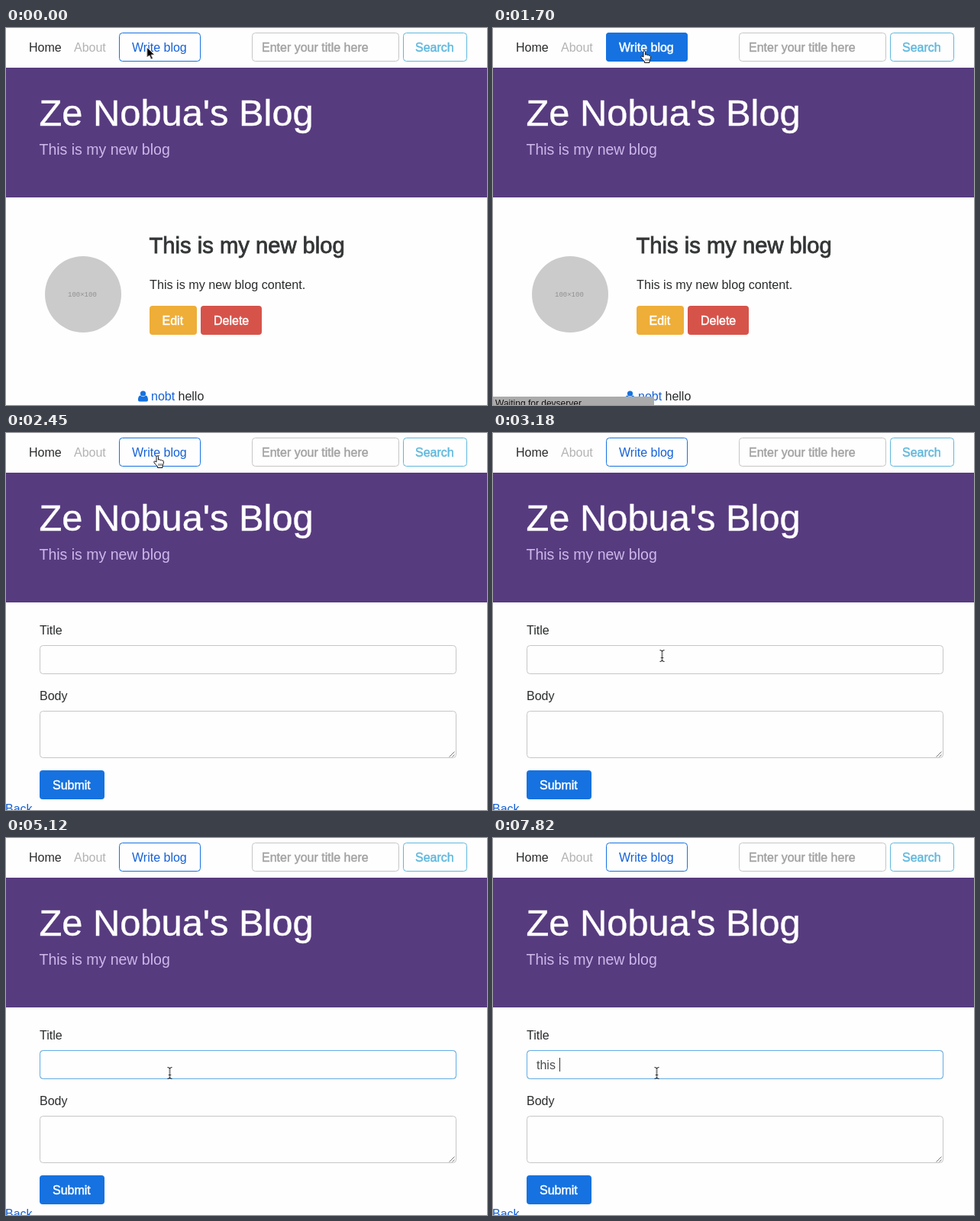
Recreate the animation shown at these times as an HTML page. Size 630 by 494 pixels, loop 8000 ms.

```html
<!DOCTYPE html>
<html lang="en">
<head>
<meta charset="utf-8">
<title>Blog: new post</title>
<style>
html, body { margin: 0; width: 100%; height: 100%; overflow: hidden; background: #fefefe; }
svg { display: block; font: 16px "Liberation Sans", Arial, sans-serif; }
text { --c: #292b2c; fill: var(--c); white-space: pre; }
.white { --c: #fff; }
.link { --c: #1562d8; }
.medium { stroke: var(--c); stroke-width: .45px; }
.box { fill: #fefefe; stroke: #c6c6c6; }
.blue { fill: #1672e0; }
.line { stroke: #1672e0; }

/* every change is a hard cut */
.t { animation: 8s step-end infinite; }
.post { animation-name: post; }
.form { animation-name: form; }
.hover { animation-name: hover; }
.bar { animation-name: bar; }
.url { animation-name: url; }
.wait { animation-name: wait; }
.arrow { animation-name: arrow; }
.hand { animation-name: hand; }
.beam { animation-name: beam; }
.focus { animation-name: focus; }
.caret { animation-name: caret; }
.word { animation-name: word; }

@keyframes post { 0% { visibility: visible } 25%, 100% { visibility: hidden } }
@keyframes form { 0% { visibility: hidden } 25%, 100% { visibility: visible } }
@keyframes hover {
  0%, 25%, 36.125%, 100% { visibility: hidden }
  8.125%, 34.25% { visibility: visible }
}
@keyframes bar {
  0%, 30.625%, 100% { opacity: 0 }
  8.125%, 28.75% { opacity: .5 }
  10% { opacity: 1 }
}
@keyframes url { 0% { visibility: visible } 21.25%, 100% { visibility: hidden } }
@keyframes wait { 0% { visibility: hidden } 21.25%, 100% { visibility: visible } }
@keyframes arrow {
  0% { visibility: visible; transform: translate(184.5px, 25px) }
  6.25% { visibility: hidden; transform: translate(184.5px, 25px) }
  36.125% { visibility: visible; transform: translate(230.5px, 234px) }
  38% { visibility: visible; transform: translate(227px, 255px) }
  39.75%, 100% { visibility: hidden; transform: translate(227px, 255px) }
}
@keyframes hand {
  0% { visibility: hidden; transform: translate(183px, 26px) }
  6.25% { visibility: visible; transform: translate(183px, 26px) }
  8.125% { visibility: visible; transform: translate(193px, 29px) }
  34.25% { visibility: visible; transform: translate(193px, 38px) }
  36.125%, 100% { visibility: hidden; transform: translate(193px, 38px) }
}
@keyframes beam {
  0% { visibility: hidden; transform: translate(221.5px, 292px) }
  39.75% { visibility: visible; transform: translate(221.5px, 292px) }
  41.625% { visibility: visible; transform: translate(216.5px, 308px) }
  43.5%, 100% { visibility: visible; transform: translate(214.5px, 308px) }
}
@keyframes focus { 0% { visibility: hidden } 45.375%, 100% { visibility: visible } }
@keyframes caret {
  0%, 51%, 64%, 77.125%, 88.375% { visibility: hidden; transform: none }
  45.375%, 56.5%, 69.625%, 82.75% { visibility: visible; transform: none }
  95.875% { visibility: visible; transform: translate(25px) }
  97.75%, 100% { visibility: visible; transform: translate(30px) }
}
@keyframes word { 0% { visibility: hidden } 95.875%, 100% { visibility: visible } }
</style>
</head>
<body>
<svg width="630" height="494" viewBox="0 0 630 494">
  <rect width="630" height="494" fill="#fefefe"/>

  <!-- navigation -->
  <text x="30" y="31">Home</text>
  <text x="89" y="31" style="--c:#b3b3b3">About</text>
  <rect class="line" x="148.5" y="6.5" width="106" height="37" rx="4" fill="#fefefe"/>
  <text class="link" x="165" y="31">Write blog</text>
  <g class="t hover">
    <rect class="blue" x="148" y="6" width="107" height="38" rx="4"/>
    <text class="white medium" x="165" y="31">Write blog</text>
  </g>
  <rect class="box" x="322.5" y="6.5" width="192" height="37" rx="4"/>
  <text class="medium" x="335" y="31" style="--c:#a2a2a2">Enter your title here</text>
  <rect x="520.5" y="6.5" width="83" height="37" rx="4" fill="#fefefe" stroke="#5fb8dd"/>
  <text class="medium" x="536" y="31" style="--c:#5fb8dd">Search</text>

  <!-- banner -->
  <rect y="52" width="630" height="170" fill="#573b7f"/>
  <text class="white medium" x="43.5" y="128" font-size="48.8">Ze Nobua's Blog</text>
  <text x="43.5" y="166" font-size="19.5" style="--c:#cdb8ea">This is my new blog</text>

  <!-- existing post -->
  <g class="t post">
    <circle cx="101" cy="349" r="50" fill="#cbcbcb"/>
    <text x="81" y="352" style="--c:#909090;font:9px 'Liberation Mono',monospace">100×100</text>
    <text class="medium" x="187.5" y="295" font-size="29.2" style="--c:#333536;stroke-width:.8px">This is my new blog</text>
    <text x="188" y="342" font-size="16.2">This is my new blog content.</text>
    <rect x="188" y="364" width="62" height="38" rx="4" fill="#eeae38"/>
    <text class="white medium" x="204.5" y="389">Edit</text>
    <rect x="255" y="364" width="80" height="38" rx="4" fill="#d6534a"/>
    <text class="white medium" x="272" y="389">Delete</text>
    <g class="blue">
      <circle cx="179.5" cy="479" r="3.6"/>
      <path d="M176 481.5C173.5 482 173 485 173 487.5Q173 489.5 175 489.5H184Q186 489.5 186 487.5C186 485 185.5 482 183 481.5Q179.5 485 176 481.5Z"/>
    </g>
    <text class="link" x="190" y="488">nobt</text>
    <text x="225.5" y="488">hello</text>
  </g>

  <!-- new post form -->
  <g class="t form">
    <text x="44" y="264">Title</text>
    <rect class="box" x="44.5" y="278.5" width="545" height="37" rx="4"/>
    <text x="44" y="350">Body</text>
    <rect class="box" x="44.5" y="364.5" width="545" height="61" rx="4"/>
    <path d="M580.5 424.5l7-7M584.5 424.5l3-3" stroke="#777" fill="none"/>
    <rect class="blue" x="44" y="442" width="85" height="38" rx="4"/>
    <text class="white medium" x="61" y="467">Submit</text>
    <text class="link" x="-1" y="498">Back</text>
  </g>
  <rect class="t focus" x="44.5" y="278.5" width="545" height="37" rx="4" fill="none" stroke="#62ade6"/>
  <text class="t word" x="57" y="303" style="--c:#4a4d4f">this</text>
  <rect class="t caret" x="57" y="288" width="1" height="18" fill="#333"/>

  <!-- status bar -->
  <g class="t bar" font-size="12">
    <path d="M0 483H208Q211 483 211 486V494H0Z" fill="#ababab"/>
    <text class="t url" x="3" y="496" style="--c:#111">devserver:3000/blogs/new</text>
    <text class="t wait" x="3" y="496" style="--c:#111">Waiting for devserver</text>
  </g>

  <!-- pointers -->
  <path class="t arrow" d="M0 0V14L3.3 11 5.6 16.3 8 15.3 5.8 10.2H10.2Z" stroke="#fff"/>
  <g class="t hand" stroke="#111" fill="#fff" stroke-linejoin="round">
    <path d="M4 9V2.2C4 .6 6.6 .6 6.6 2.2V6.2C7 5.4 9 5.5 9.2 6.8C9.7 6 11.3 6.2 11.5 7.4C12 6.8 13.4 7 13.4 8.4C13.6 11 12.6 12.6 12 14.2V16.5H5.5V15C4 13.5 2.6 11.8 1 9.8C.2 8.4 1.6 7.4 2.8 8.4Z"/>
    <path d="M7 11v3M9 11v3M11 11v3" stroke-width=".7"/>
  </g>
  <path class="t beam" d="M-3 -7.5Q0 -7.5 0 -5.5Q0 -7.5 3 -7.5M0 -5.5V5.5M-3 7.5Q0 7.5 0 5.5Q0 7.5 3 7.5M-1.5 2.5h3" fill="none" stroke="#111"/>
</svg>
</body>
</html>
```
